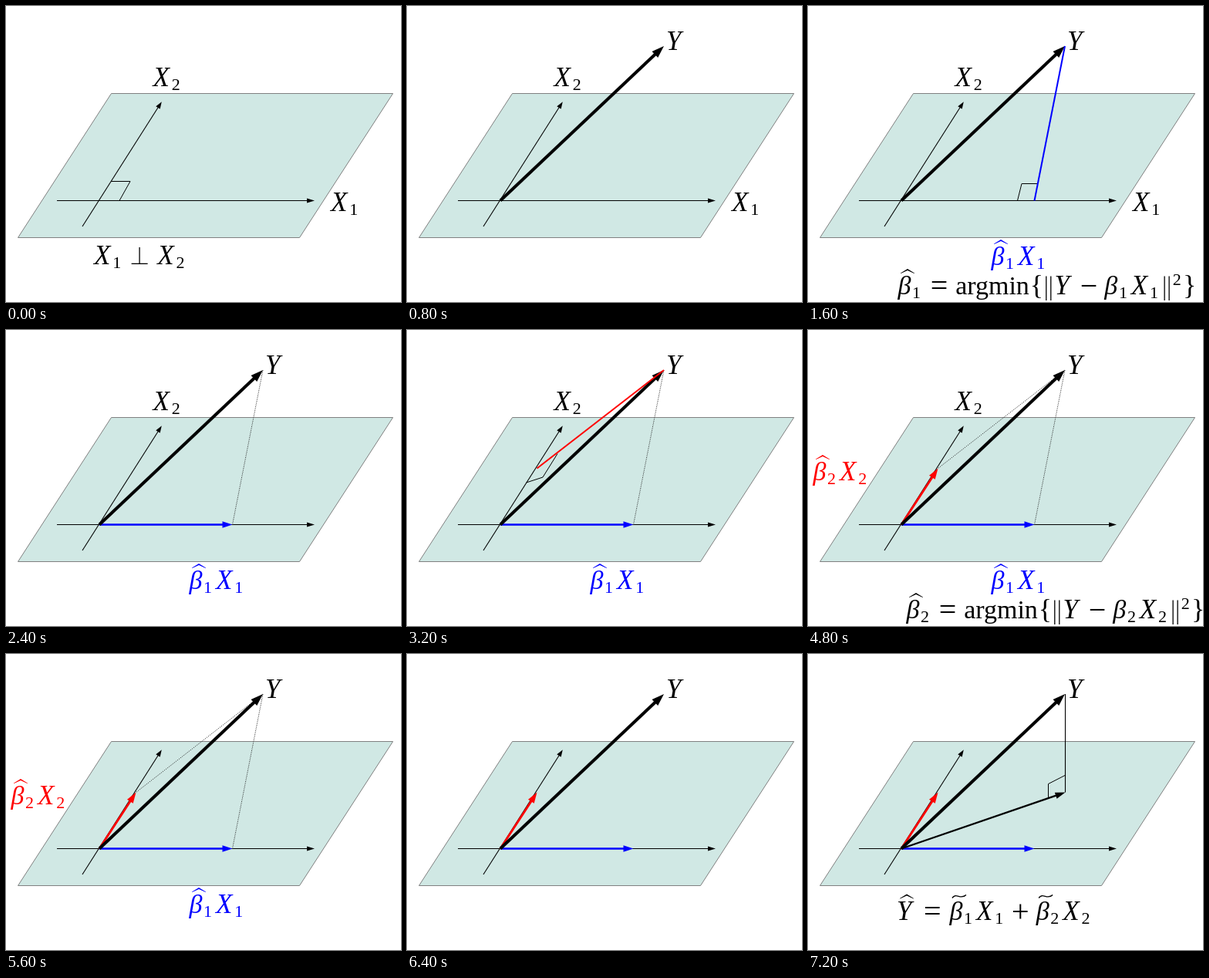
Recreate the animation shown at these times as an HTML page with a canvas. Size 512 px wide and 384 px high, loop 8000 ms.

```html
<!DOCTYPE html>
<html lang="en">
<head>
<meta charset="utf-8">
<title>Projection onto a plane</title>
<style>
  html, body { margin: 0; width: 100%; height: 100%; overflow: hidden; background: #fff; }
  canvas { display: block; width: 512px; height: 384px; }
</style>
</head>
<body>
<canvas id="stage" width="512" height="384"></canvas>
<script>
const ctx = document.getElementById('stage').getContext('2d');
const LOOP = 8000;
const STEPS = [0, 800, 1600, 2400, 3200, 4800, 5600, 6400, 7200];
const BLACK = '#000', BLUE = '#00f', RED = '#f00';
const SERIF = '"Liberation Serif", "Times New Roman", serif';
const EM = 31.6;

const ORIGIN = [121, 252.5], TIP = [333, 52];
const FOOT1 = [293.5, 252.5], FOOT2 = [168.5, 179.5], FIT = [333.5, 179.5];

function line(points, color = BLACK, width = 1, dash = []) {
  ctx.beginPath();
  points.forEach(p => ctx.lineTo(...p));
  ctx.strokeStyle = color;
  ctx.lineWidth = width;
  ctx.setLineDash(dash);
  ctx.stroke();
  ctx.setLineDash([]);
}

function polygon(points, color) {
  ctx.beginPath();
  points.forEach(p => ctx.lineTo(...p));
  ctx.closePath();
  ctx.fillStyle = color;
  ctx.fill();
}

function arrow(from, to, color, width, head, half) {
  const dx = to[0] - from[0], dy = to[1] - from[1];
  const len = Math.hypot(dx, dy), ux = dx / len, uy = dy / len;
  const bx = to[0] - ux * head, by = to[1] - uy * head;
  line([from, [bx + ux, by + uy]], color, width);
  polygon([to, [bx - uy * half, by + ux * half], [bx + uy * half, by - ux * half]], color);
}

const dotted = (a, b) => line([a, b], '#222', 1, [1, 1.4]);

function glyph(text, x, y, size, style = '') {
  ctx.font = `${style} ${size}px ${SERIF}`;
  ctx.fillText(text, x, y);
}

function hat(x, y) {
  polygon([[x, y + 5.4], [x + 9, y], [x + 18, y + 5.4], [x + 17.6, y + 6], [x + 9, y + 2], [x + 0.4, y + 6]], ctx.fillStyle);
}

function tilde(x, y) {
  ctx.beginPath();
  ctx.moveTo(x, y + 4.5);
  ctx.bezierCurveTo(x + 5, y - 3, x + 11, y + 7.5, x + 18, y + 0.5);
  ctx.strokeStyle = ctx.fillStyle;
  ctx.lineWidth = 1.4;
  ctx.stroke();
}

// Each drawer paints one symbol at (x, y) and has an advance in em.
const SYMBOLS = {
  X: [0.83, (x, y) => glyph('X', x + 2, y, 35, 'italic')],
  Y: [0.8, (x, y) => glyph('Y', x, y, 35, 'italic')],
  b: [0.62, (x, y) => glyph('β', x + 1, y, 34, 'italic')],
  h: [0.62, (x, y) => { SYMBOLS.b[1](x, y); hat(x + 4.5, y - 33); }],
  t: [0.62, (x, y) => { SYMBOLS.b[1](x, y); tilde(x + 4.5, y - 33); }],
  H: [0.8, (x, y) => { SYMBOLS.Y[1](x, y); hat(x + 4, y - 33.5); }],
  1: [0.44, (x, y) => glyph('1', x, y + 5, 22)],
  2: [0.44, (x, y) => glyph('2', x, y + 5, 22)],
  s: [0.45, (x, y) => glyph('2', x, y - 12, 22)],
  A: [3.06, (x, y) => glyph('argmin', x, y, 34)],
  '{': [0.5, (x, y) => glyph('{', x, y, 36)],
  '}': [0.5, (x, y) => glyph('}', x - 1, y, 36)],
  '|': [0.5, (x, y) => {
    for (const dx of [4.5, 10.5]) ctx.fillRect(x + dx, y - 23.5, 1.3, 31.5);
  }],
  '^': [1.33, (x, y) => {
    ctx.fillRect(x + 10.5, y - 1.3, 21, 1.3);
    ctx.fillRect(x + 20.3, y - 22, 1.3, 22);
  }]
};
for (const [key, text, space] of [['=', '=', 0.278], ['+', '+', 0.222], ['-', '−', 0.222]]) {
  SYMBOLS[key] = [0.778 + 2 * space, (x, y) => glyph(text, x + space * EM + 1, y + 2, 40)];
}

function formula(code, x, y, color = BLACK) {
  for (const c of code) {
    const [advance, draw] = SYMBOLS[c];
    ctx.fillStyle = color;
    draw(x, y);
    x += advance * EM;
  }
}

function plane() {
  const corners = [[15.5, 300.5], [380.5, 300.5], [501.5, 113.5], [136.5, 113.5]];
  polygon(corners, '#d0e8e4');
  line([...corners, corners[0]], '#808080');
  arrow([66, 252.5], [400, 252.5], BLACK, 1.1, 10, 3);
  arrow([99, 286], [201.8, 124.3], BLACK, 1.1, 9, 3.2);
}

function draw(step) {
  ctx.fillStyle = '#fff';
  ctx.fillRect(0, 0, 512, 384);
  plane();

  if (step < 6) formula('X2', 188.5, 104);
  if (step < 3) formula('X1', 419, 266);

  if (step === 0) {
    line([[136, 227.5], [161, 227.5], [147, 252.5]]);
    formula('X1^X2', 112, 335);
    return;
  }

  if (step >= 3) arrow(ORIGIN, FOOT1, BLUE, 2.4, 13, 4.2);
  if (step >= 5) arrow(ORIGIN, FOOT2, RED, 2.8, 14, 4.6);
  if (step === 8) arrow(ORIGIN, FIT, BLACK, 2.2, 13, 4.2);
  arrow(ORIGIN, TIP, BLACK, 4, 16, 5.6);
  formula('Y', 336, 57);

  if (step >= 3 && step < 7) dotted(TIP, FOOT1);
  if (step === 5 || step === 6) dotted(TIP, FOOT2);
  if (step >= 2 && step < 7) formula('h1X1', 236.5, 336, BLUE);
  if (step === 5 || step === 6) formula('h2X2', 5.5, 195, RED);

  if (step === 2) {
    line([[271.5, 252.5], [277, 230.5], [298, 230.5]]);
    line([TIP, FOOT1], BLUE, 2);
    formula('h1=A{|Y-b1X1|s}', 115.5, 374);
  }
  if (step === 4) {
    line([[154.5, 198], [176, 191], [195, 160.5]]);
    line([TIP, FOOT2], RED, 2);
  }
  if (step === 5) formula('h2=A{|Y-b2X2|s}', 126.5, 374);
  if (step === 8) {
    line([[333.5, 52], FIT], BLACK, 1.1);
    line([[333, 157.5], [311.5, 168.5], [311.5, 187]]);
    formula('H=t1X1+t2X2', 115, 345);
  }
}

const start = performance.now();
let shown = -1;
function tick() {
  const t = (performance.now() - start) % LOOP;
  const step = STEPS.filter(s => s <= t).length - 1;
  if (step !== shown) draw(shown = step);
  requestAnimationFrame(tick);
}
tick();
</script>
</body>
</html>
```
